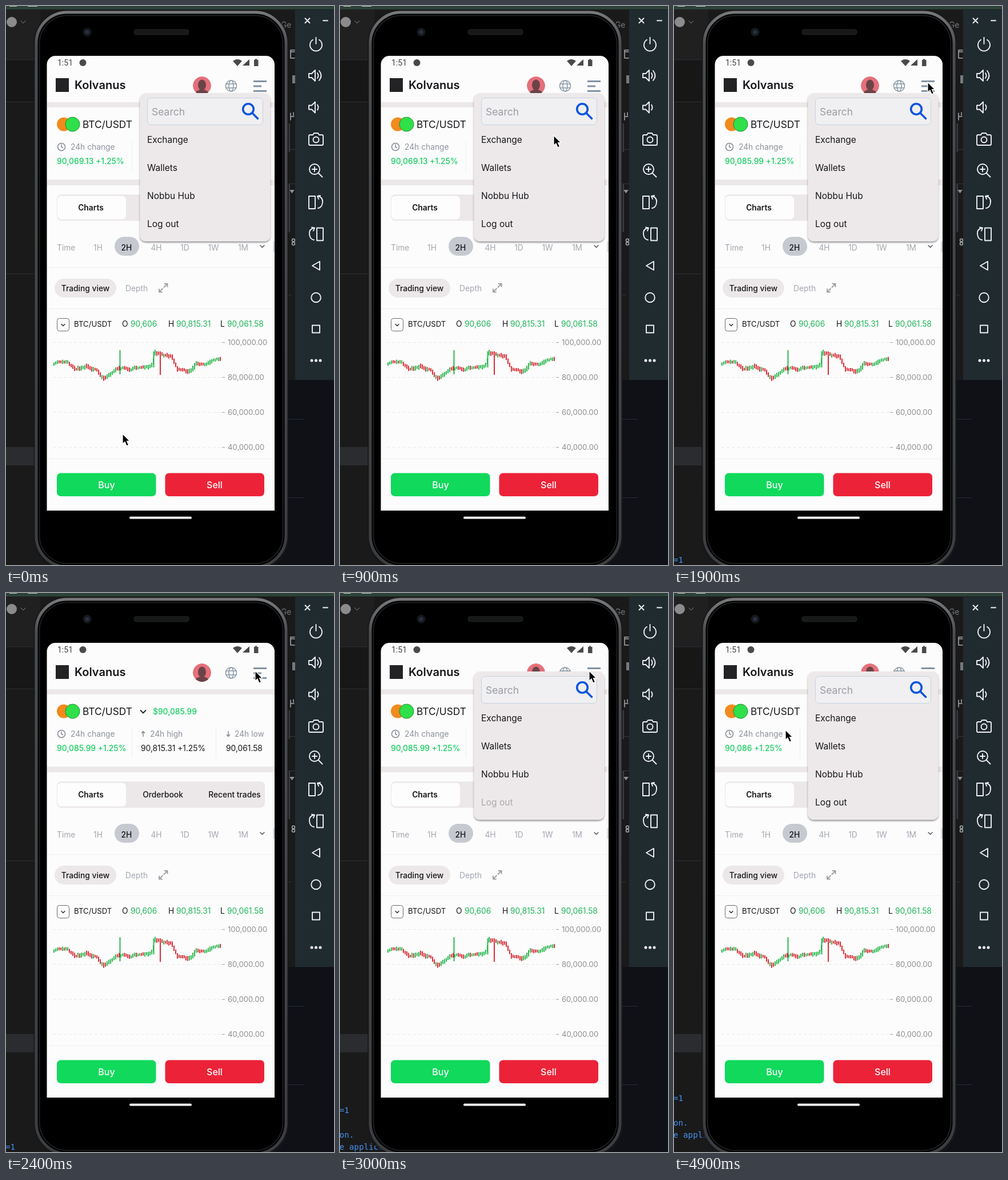
Animation, 574 px wide and 976 px high, one loop 5 s. Source, as an HTML page:

```html
<!DOCTYPE html>
<html lang="en">
<head>
<meta charset="utf-8">
<title>Trading app in a phone emulator</title>
<style>
html, body { margin: 0; width: 100%; height: 100%; overflow: hidden; background: #1a1a1b; }
svg { display: block; width: 574px; height: 976px; }
text { font: 400 13.8px Inter, "Open Sans", sans-serif; fill: #16161a; }
.mid { text-anchor: middle; }
.m { font-weight: 500; }
.b { font-weight: 600; }
.grey { fill: #8d929b; }
.pale { fill: #a3a7b0; }
.green { fill: #1fb45a; }
.price { fill: #19cf63; font-weight: 500; }
.pair { font-size: 17.3px; }
.small { font-size: 13.2px; }
.brand { font-size: 20px; font-weight: 600; }
.clock { font: 14px Roboto, sans-serif; fill: #444; }
.tab { fill: #77787b; }
.axis text { font-size: 13.1px; fill: #8f8f92; }
.menu text { font-size: 15.5px; }
.menu .hint { font-size: 17.5px; fill: #9a9da3; }
.btn { font-size: 16px; font-weight: 500; fill: #fff; text-anchor: middle; }
.term text { font: 14.2px "DejaVu Sans Mono", monospace; fill: #4792ee; }
.line { fill: none; stroke-linecap: round; stroke-linejoin: round; }

.cursor, .term, .menu, .item, .p1, .p2, .p3 { animation: 5s linear infinite; }
.cursor { animation-name: point; }
.term { animation-name: scroll; animation-timing-function: step-end; }
.menu { animation-name: panel; }
.item { animation-name: item; animation-delay: calc(var(--i) * 100ms); }
.p1 { animation-name: p1; animation-timing-function: step-end; }
.p2 { animation-name: p2; animation-timing-function: step-end; }
.p3 { animation-name: p3; animation-timing-function: step-end; }

@keyframes point {
  0% { transform: translate(204px, 747px); animation-timing-function: ease-in-out; }
  18%, 20% { transform: translate(374px, 226px); animation-timing-function: ease-in-out; }
  35%, 39% { transform: translate(444px, 133px); }
  45%, 79% { transform: translate(436px, 136px); }
  84% { transform: translate(400px, 194px); }
  90% { transform: translate(270px, 234px); animation-timing-function: ease-out; }
  98%, 100% { transform: translate(195px, 239px); }
}
@keyframes scroll {
  0% { transform: translateY(1040px); }
  30% { transform: translateY(972px); }
  50% { transform: translateY(951px); }
  54%, 80% { transform: translateY(908px); }
  82%, 100% { transform: translateY(887px); }
}
@keyframes panel {
  0%, 44% { opacity: 1; transform: none; }
  48% { opacity: 0; transform: none; }
  48.01%, 52% { opacity: 0; transform: translateY(-15px); }
  55%, 100% { opacity: 1; transform: translateY(-15px); }
}
@keyframes item {
  0%, 48% { opacity: 1; }
  48.01%, 53.4% { opacity: 0; }
  55.4%, 100% { opacity: 1; }
}
@keyframes p1 { 0% { opacity: 1; } 30%, 100% { opacity: 0; } }
@keyframes p2 { 0% { opacity: 0; } 30% { opacity: 1; } 68%, 100% { opacity: 0; } }
@keyframes p3 { 0% { opacity: 0; } 68%, 100% { opacity: 1; } }
</style>
</head>
<body>
<svg viewBox="0 0 574 976">
  <defs>
    <filter id="soft" x="-10%" y="-10%" width="120%" height="120%">
      <feDropShadow dx="0" dy="2" stdDeviation="1.8" flood-opacity=".42"/>
    </filter>
    <linearGradient id="rim" x2="0" y2="1">
      <stop offset="0" stop-color="#77797b"/>
      <stop offset=".06" stop-color="#4b4d50"/>
      <stop offset="1" stop-color="#3b3d40"/>
    </linearGradient>
    <clipPath id="face"><circle cx="343" cy="139" r="16"/></clipPath>
  </defs>

  <!-- desktop behind the phone -->
  <rect width="574" height="976" fill="#1a1a1b"/>
  <rect y="6" width="60" height="88" fill="#202021"/>
  <rect y="94" width="60" height="73" fill="#171718"/>
  <path d="M0 94H60M0 167.5H60M0 467.5H60" stroke="#303032"/>
  <rect y="770" width="70" height="32" fill="#2b2c2f"/>
  <rect x="470" y="653" width="104" height="323" fill="#0f1117"/>
  <path d="M490 721.5H521M490 858.5H521" stroke="#2a2d34"/>
  <rect width="574" height="6" fill="#2c4238"/>
  <path d="M6 0h13M38 0h17" stroke="#c9d2cd" stroke-width="2"/>
  <circle cx="10" cy="28" r="9" fill="#8b8b8d"/>
  <path class="line" d="M26 26l4 4 4-4" stroke="#858587"/>
  <text x="481" y="38" class="tab">Ge</text>
  <g class="line" stroke="#a9abae" stroke-width="1.5">
    <path d="M505 77h-7v14h7M498 80h7M498 187v12M498 193h6M503 186v5"/>
    <circle cx="503" cy="409" r="2.5"/><circle cx="503" cy="415" r="2.5"/>
  </g>
  <path d="M501 121h5v14h-5z" fill="#77797c"/>
  <path d="M496 321h9l-4.500 6z" fill="#8d8f92"/>
  <path d="M490 250.5h16M490 310.5h16M490 504.5h9" stroke="#37393d"/>

  <g class="term">
    <text x="-1">=1</text>
    <text x="-1" y="43">on.</text>
    <text x="-1" y="64">e application</text>
  </g>

  <!-- phone body -->
  <path d="M493 205h4v50h-4zM493 310h4v85h-4z" fill="#3a3c3f"/>
  <rect x="48" y="8" width="447" height="977" rx="56" fill="#17181a" fill-opacity=".72"/>
  <rect x="53" y="11" width="437" height="968" rx="54" fill="#000" stroke="url(#rim)" stroke-width="5"/>
  <rect x="58.5" y="16.5" width="426" height="957" rx="49" fill="none" stroke="#1d1e20" stroke-width="2"/>
  <rect x="224" y="41" width="96" height="9" rx="4" fill="#171818" stroke="#232525"/>
  <circle cx="142" cy="45.5" r="7.5" fill="#16181c"/>
  <circle cx="142" cy="45.5" r="3.5" fill="#283046"/>
  <rect x="216" y="891.5" width="109" height="4" rx="2" fill="#f4f4f4"/>

  <!-- app screen -->
  <path d="M71.500 881V102a15 15 0 0 1 15-15H455a15 15 0 0 1 15 15V881z" fill="#fcfcfc"/>
  <text x="90" y="104" class="clock">1:51</text>
  <g fill="#4a4a4c">
    <circle cx="134.5" cy="99" r="6"/>
    <path d="M397 96q8-6 16 0l-8 9zM414 104h12V93zM434 94h2v-1.5h3V94h2.5v11H434z"/>
  </g>
  <rect x="87" y="126" width="23" height="24" fill="#232325"/>
  <text x="120" y="145" class="brand">Kolvanus</text>
  <g clip-path="url(#face)">
    <circle cx="343" cy="139" r="16" fill="#e4707b"/>
    <path d="M329 157q2-11 14-11t14 11z" fill="#6b4347"/>
    <ellipse cx="343" cy="138" rx="7" ry="9.5" fill="#6b4347"/>
  </g>
  <g class="line" stroke="#8b99a6" stroke-width="1.5">
    <circle cx="394" cy="139.5" r="9.5"/>
    <ellipse cx="394" cy="139.5" rx="4" ry="9.5"/>
    <path d="M385 136h18M385 143h18"/>
  </g>
  <path d="M433 131.5h23M433 140h14M433 148.5h23" stroke="#8292a1" stroke-width="3"/>

  <path d="M72 168h398v9H72zM72 303h398v10H72z" fill="#ece8e9"/>
  <circle cx="101" cy="206.5" r="12" fill="#f28a1c"/>
  <circle cx="116.5" cy="206.5" r="12.5" fill="#2fe04a" stroke="#188f2b"/>
  <text x="134" y="213" class="pair">BTC/USDT</text>
  <path class="line" d="M235.5 205l4.5 4.5 4.5-4.5" stroke="#222" stroke-width="1.8"/>
  <text x="257" y="211.5" class="price">$90,085.99</text>
  <g class="line" stroke="#858a94" stroke-width="1.5">
    <circle cx="97" cy="246" r="6.5"/><path d="M97 242v4l2.5 1.5"/>
    <path d="M240 250.5v-9m-2.5 3l2.5-3 2.5 3M389 241.5v9m-2.5-3l2.5 3 2.5-3"/>
  </g>
  <text x="113" y="251" class="grey">24h change</text>
  <text x="252" y="251" class="grey">24h high</text>
  <text x="400" y="251" class="grey">24h low</text>
  <text x="89" y="276" class="price p1">90,069.13 +1.25%</text>
  <text x="89" y="276" class="price p2">90,085.99 +1.25%</text>
  <text x="89" y="276" class="price p3">90,086 +1.25%</text>
  <text x="236" y="276">90,815.31 +1.25%</text>
  <text x="385" y="276">90,061.58</text>
  <path d="M220.5 237v51M367.5 237v51" stroke="#eeeeef"/>

  <rect x="89" y="329" width="364" height="46" rx="8" fill="#ece8e9"/>
  <rect x="90" y="331.5" width="120" height="41" rx="7" fill="#fdfdfd"/>
  <text x="148.5" y="357" class="mid b">Charts</text>
  <text x="274.5" y="357" class="mid m">Orderbook</text>
  <text x="400" y="357" class="mid m">Recent trades</text>

  <rect x="190" y="403" width="43" height="33" rx="16.5" fill="#c6c9d0"/>
  <text x="89" y="426.5" class="pale">Time</text>
  <text x="161" y="426.5" class="pale mid">1H</text>
  <text x="211" y="426.5" class="mid m">2H</text>
  <text x="263" y="426.5" class="pale mid">4H</text>
  <text x="313" y="426.5" class="pale mid">1D</text>
  <text x="363" y="426.5" class="pale mid">1W</text>
  <text x="415" y="426.5" class="pale mid">1M</text>
  <path class="line" d="M445 418l3.5 3.5 3.5-3.5" stroke="#555a63" stroke-width="1.5"/>
  <path d="M468.5 411v18" stroke="#c8cad0" stroke-width="2"/>
  <path d="M72 456.5h398M72 528.5h398M72 790.5h398" stroke="#efeff0"/>

  <rect x="85" y="476" width="108" height="33" rx="16.5" fill="#ece8e9"/>
  <text x="139" y="497.5" class="mid m">Trading view</text>
  <text x="209" y="497.5" class="pale">Depth</text>
  <path class="line" d="M268 499.5l6-6M276.5 491l6-6M277.5 485h5v5M268 494.5v5h5" stroke="#9fa1a6" stroke-width="2"/>

  <rect x="89.5" y="545.5" width="21" height="22" rx="4" fill="none" stroke="#6c6c70"/>
  <path class="line" d="M97 555.5l3 3 3-3" stroke="#333" stroke-width="1.5"/>
  <text x="119" y="560" class="small">BTC/USDT</text>
  <text x="203" y="560">O</text><text x="218" y="560" class="green">90,606</text>
  <text x="284" y="560">H</text><text x="298" y="560" class="green">90,815.31</text>
  <text x="375" y="560">L</text><text x="387" y="560" class="green">90,061.58</text>

  <g class="axis">
    <path d="M83 587.5H378M83 648.5H378M83 709.5H378M83 770.5H378" stroke="#e8e8ea" stroke-dasharray="5 4"/>
    <path d="M378 587.5h5M378 648.5h5M378 709.5h5M378 770.5h5" stroke="#a2a2a5"/>
    <text x="388" y="592">100,000.00</text>
    <text x="388" y="653">80,000.00</text>
    <text x="388" y="714">60,000.00</text>
    <text x="388" y="775">40,000.00</text>
  </g>
  <path id="rise" stroke="#22b548" stroke-width="1.9"/>
  <path id="fall" stroke="#d5242f" stroke-width="1.9"/>

  <rect x="89" y="815.5" width="173.5" height="40.5" rx="7" fill="#10d95c"/>
  <rect x="278.500" y="815.5" width="173.5" height="40.5" rx="7" fill="#ec2338"/>
  <text x="176" y="842" class="btn">Buy</text>
  <text x="365" y="842" class="btn">Sell</text>

  <g class="menu">
    <rect x="234.5" y="152" width="228" height="259" rx="10" fill="#ede9ea" filter="url(#soft)"/>
    <rect x="247.5" y="160.5" width="202" height="47" rx="6" fill="#f0eff1" stroke="#c5d2df"/>
    <text x="255" y="191" class="hint">Search</text>
    <g class="line" stroke="#0c55df" stroke-width="3.6">
      <circle cx="424" cy="180" r="9.3"/><path d="M431.5 187.5l9 9"/>
    </g>
    <text x="247" y="239" class="item" style="--i:0">Exchange</text>
    <text x="247" y="288" class="item" style="--i:1">Wallets</text>
    <text x="247" y="336.5" class="item" style="--i:2">Nobbu Hub</text>
    <text x="247" y="385.5" class="item" style="--i:3">Log out</text>
  </g>

  <!-- emulator toolbar -->
  <rect x="506" y="7" width="68" height="646" fill="#202b30"/>
  <g class="line" stroke="#eef1f2" stroke-width="1.9">
    <path d="M523.5 21.5l8 8m0-8l-8 8M555 25.5h8"/>
    <path d="M537 59a10.5 10.5 0 1 0 11 0M542.5 55v11"/>
    <path id="spk" d="M530 118h5l6-6v19l-6-6h-5zM545 117q3 4.5 0 9"/>
    <path d="M548 113q7 8.5 0 17"/>
    <use href="#spk" y="55.5"/>
    <path d="M532 225h5l2-3h7l2 3h5q2 0 2 2v14q0 2-2 2h-21q-2 0-2-2v-14q0-2 2-2z"/>
    <circle cx="542.5" cy="233.5" r="5"/>
    <circle cx="540" cy="285" r="9"/><path d="M546.5 291.5l7 7M536 285h8M540 281v8"/>
    <path id="turn" d="M530 332h11v22h-11zM546 332q9 2 8 11t-8 10M550 331l-5 1 2 5"/>
    <use href="#turn" transform="matrix(-1 0 0 1 1085 55.5)"/>
    <path d="M549 446v15l-13-7.5z"/>
    <circle cx="542.5" cy="509" r="8.3"/>
    <path d="M536 557.5h13v13h-13z"/>
  </g>
  <g fill="#f1f4f5"><circle cx="535" cy="619" r="2.5"/><circle cx="542.5" cy="619" r="2.5"/><circle cx="550" cy="619" r="2.5"/></g>

  <path class="cursor" d="M0 0V17.5L4 14l3 7 3.5-1.5-3-7H12.5z" fill="#000" stroke="#fff" stroke-width="1.2"/>
</svg>
<script>
// Candles follow a coarse price line given as x, y pairs.
const line = [83,626, 88,622, 108,621, 113,627, 121,634, 143,629, 152,634, 160,636, 166,646,
  173,650, 180,645, 190,636, 198,633, 210,632, 218,636, 225,632, 250,630, 257,627, 261,605,
  275,609, 290,612, 295,622, 300,633, 320,638, 327,634, 332,625, 345,626, 353,624, 360,620,
  370,616, 380,615];

function priceAt(x) {
  let i = 0;
  while (i < line.length - 4 && line[i + 2] < x) i += 2;
  const [x0, y0, x1, y1] = line.slice(i, i + 4);
  return y0 + (y1 - y0) * (x - x0) / (x1 - x0);
}

let seed = 11;
const random = () => (seed = seed * 16807 % 2147483647) / 2147483647;

let rise = "M199.5 601V643M258.5 603V631";
let fall = "M270 603V644";
for (let x = 84; x < 378; x += 3) {
  const slope = priceAt(x + 2) - priceAt(x - 2);
  const half = 2 + random() * 2 + Math.min(Math.abs(slope) * 0.25, 2);
  const y = priceAt(x) + random() * 2 - 1;
  const bar = `M${x.toFixed(1)} ${(y - half).toFixed(1)}v${(half * 2).toFixed(1)}`;
  if (slope + random() * 6 - 3 < 0) rise += bar; else fall += bar;
}
document.getElementById("rise").setAttribute("d", rise);
document.getElementById("fall").setAttribute("d", fall);

// The screen updates ten times a second, so step every animation by that clock.
const loop = 5000, step = 100;
const clips = document.getAnimations();
const start = performance.now();
clips.forEach(clip => clip.pause());

function tick() {
  const time = (performance.now() - start) % loop;
  const held = Math.floor(time / step) * step;
  clips.forEach(clip => { clip.currentTime = held; });
  requestAnimationFrame(tick);
}
tick();
</script>
</body>
</html>
```
